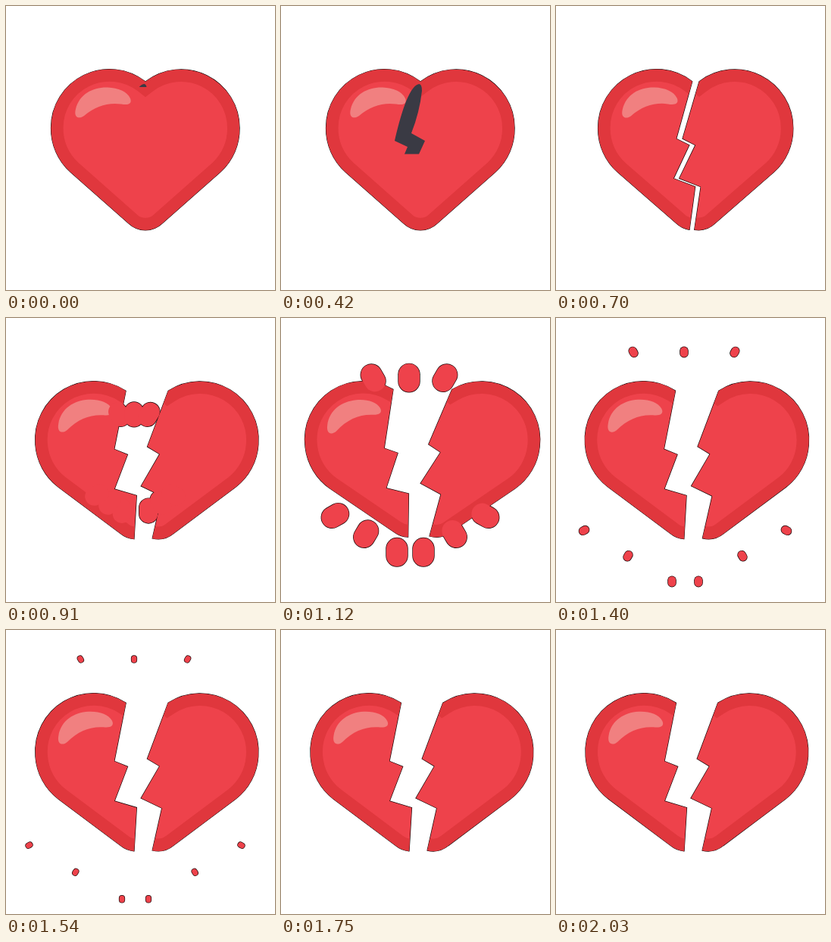
An HTML page with a canvas that plays this animation: 355x375 px, repeating every 3150 ms.

```html
<!DOCTYPE html>
<html lang="en">
<head>
<meta charset="utf-8">
<title>Breaking heart</title>
<style>
  html, body { margin: 0; width: 100%; height: 100%; overflow: hidden; background: #fff; }
  canvas { display: block; }
</style>
</head>
<body>
<canvas id="stage" width="355" height="375"></canvas>
<script>
const ctx = document.getElementById('stage').getContext('2d');
const LOOP = 3150, STEP = 70, REST = 2030;
const BREAK = 630, PEAK = 1050, BURST = 770, BURST_END = 1680;
const RED = '#ee424b', RIM = '#e0373d', GLOSS = '#f18080', DARK = '#3a3a44', EDGE = '#190607';

const leftSide = 'M184 100 A77 77 0 0 0 59.6 161 A77 77 0 0 0 85 219 L162 287 A32 32 0 0 0 ';
const rightSide = 'M184 100 A77 77 0 0 1 308 161 A77 77 0 0 1 283 219 L206 287 A32 32 0 0 1 ';
const split = '179 295.6 L187 239 L158.5 228 L179.5 184 L162.5 175.5 Z';
const heart = new Path2D(leftSide + '206 287 L283 219 A77 77 0 0 0 308 161 A77 77 0 0 0 184 100 Z');
const halves = [
  { path: new Path2D(leftSide + split), side: -1, x: 136, reach: 1, glossy: true },
  { path: new Path2D(rightSide + split), side: 1, x: 231.5, reach: 1.2 }
];
const gloss = new Path2D('M92 136 C97 116 115 107 134 107.5 C148 108 160 113 164 122 ' +
  'C167 130 160 131 152 129.5 C135 127 118 132 103 145 C96 150 89 147 92 136 Z');
const crack = new Path2D('M182 103 Q186 103 186 112 Q183 140 172 168 L190 178 L170 222 L197 234 ' +
  'L180 297 L176 290 L177 243 L148 231 L167 186 L150 178 C157 148 168 106 182 103 Z');

// Three drops fan out above the heart, three on each side below it
const drops = [];
for (const i of [-1, 0, 1]) {
  drops.push({ x0: 169 - 6 * i, y0: 172, x1: 169 + 71.5 * i, y1: 37 });
}
for (const side of [-1, 1]) {
  for (let i = 0; i < 3; i++) {
    drops.push({
      x0: 170.5 + side * (17.5 - 6 * i), y0: 204 + 2 * i,
      x1: 170.5 + side * (17.5 + 62 * i), y1: 357 - 36 * i
    });
  }
}

// The halves fly apart, then fall back towards their resting distance
function gapAt(t) {
  if (t <= BREAK) return 0;
  if (t <= PEAK) return 34 * Math.pow((t - BREAK) / (PEAK - BREAK), 1.2);
  return 20.6 + 13.4 * Math.exp((PEAK - t) / 119);
}

function place(half, gap, draw) {
  ctx.save();
  ctx.translate(half.x + half.side * half.reach * gap, 161);
  ctx.rotate(half.side * Math.pow(gap, 1.5) * 0.00085);
  ctx.translate(-half.x, -161);
  draw();
  ctx.restore();
}

function outline(path) {
  ctx.strokeStyle = EDGE;
  ctx.lineWidth = 1.4;
  ctx.stroke(path);
}

function fillBody(path, glossy) {
  ctx.fillStyle = RED;
  ctx.fill(path);
  ctx.save();
  ctx.clip(path);
  ctx.strokeStyle = RIM;
  ctx.lineWidth = 32;
  ctx.stroke(heart);
  ctx.restore();
  if (glossy) {
    ctx.fillStyle = GLOSS;
    ctx.fill(gloss);
  }
}

function drawDrops(t, color, grow) {
  if (t <= BURST || t >= BURST_END) return;
  const remaining = Math.pow((BURST_END - t) / (BURST_END - BURST), 2.4);
  const width = Math.min(28, 6 + 71 * remaining) * Math.min(1, (t - BURST) / 160);
  const tail = width * 0.17;
  ctx.strokeStyle = color;
  ctx.lineCap = 'round';
  ctx.lineWidth = width + grow;
  for (const { x0, y0, x1, y1 } of drops) {
    const dx = x1 - x0, dy = y1 - y0, length = Math.hypot(dx, dy);
    const x = x1 - dx * remaining, y = y1 - dy * remaining;
    const tx = dx / length * tail, ty = dy / length * tail;
    ctx.beginPath();
    ctx.moveTo(x - tx, y - ty);
    ctx.lineTo(x + tx, y + ty);
    ctx.stroke();
  }
}

function drawCrack(t) {
  ctx.save();
  ctx.beginPath();
  ctx.rect(0, 0, 355, 107 + 191 * Math.pow(t / BREAK, 1.9));
  ctx.clip();
  ctx.fillStyle = DARK;
  ctx.fill(crack);
  ctx.restore();
}

function render(t) {
  ctx.fillStyle = '#fff';
  ctx.fillRect(0, 0, 355, 375);
  const gap = gapAt(t);
  if (!gap) {
    outline(heart);
    fillBody(heart, true);
    drawCrack(t);
    return;
  }
  // Edges go first so that overlapping shapes merge
  for (const half of halves) place(half, gap, () => outline(half.path));
  drawDrops(t, EDGE, 1.4);
  for (const half of halves) place(half, gap, () => fillBody(half.path, half.glossy));
  drawDrops(t, RED, 0);
}

function tick() {
  const t = performance.now() % LOOP;
  render(Math.min(REST, Math.floor(t / STEP) * STEP));
  requestAnimationFrame(tick);
}
tick();
</script>
</body>
</html>
```
